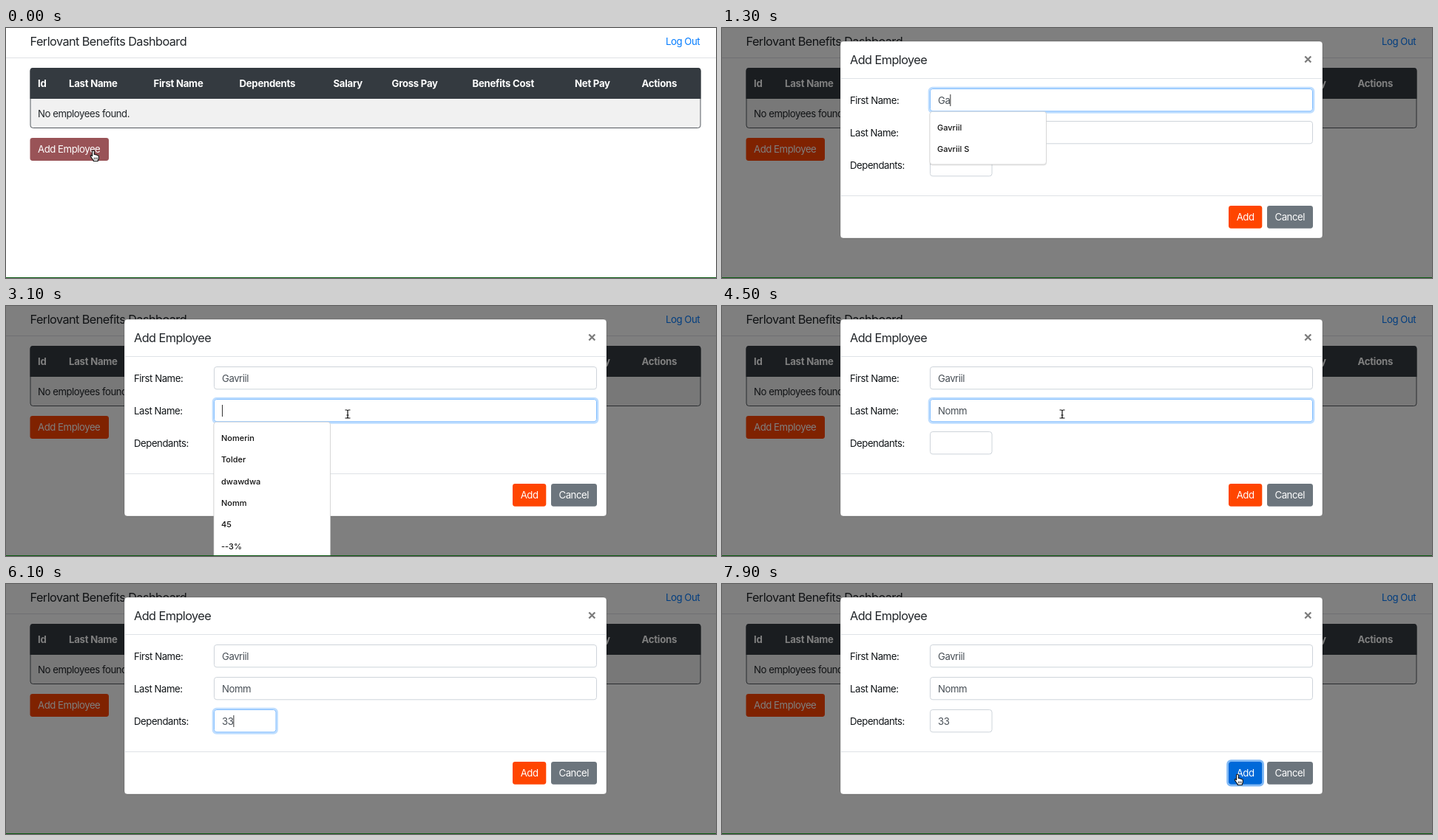
Recreate the animation shown at these times as an HTML page. Size 960 by 339 pixels, loop 8000 ms.

```html
<!DOCTYPE html>
<html lang="en">
<head>
<meta charset="utf-8">
<title>Benefits Dashboard</title>
<style>
html, body { margin: 0; width: 100%; height: 100%; overflow: hidden; background: #fff; }
svg { display: block; width: 960px; height: 339px; }
text { font: 400 13.2px Inter, "Liberation Sans", sans-serif; letter-spacing: -.035em; fill: #212529; white-space: pre; }
.title { font-size: 16.3px; }
.head { font-weight: 700; fill: #fff; letter-spacing: -.02em; }
.label { fill: #111518; }
.value { fill: #495057; }
.btn { fill: #fff; }
.item { font-size: 11px; font-weight: 500; fill: #111; letter-spacing: 0; }
</style>
</head>
<body>
<svg id="stage" viewBox="0 0 960 339" xmlns="http://www.w3.org/2000/svg"></svg>
<script>
const LOOP = 8000, STEP = 100;
const ORANGE = [255, 69, 0], BLUE = [0, 105, 217];
const stage = document.getElementById('stage');

const clamp = v => Math.max(0, Math.min(1, v));
const mix = k => `rgb(${ORANGE.map((c, i) => Math.round(c + (BLUE[i] - c) * k))})`;

function add(parent, tag, attrs = {}, content) {
  const el = document.createElementNS(stage.namespaceURI, tag);
  set(el, attrs);
  if (content !== undefined) el.textContent = content;
  parent.appendChild(el);
  return el;
}
function set(el, attrs) {
  for (const k in attrs) el.setAttribute(k, attrs[k]);
}
const group = (parent = stage) => add(parent, 'g');
const rect = (p, x, y, width, height, fill, more = {}) => add(p, 'rect', { x, y, width, height, fill, ...more });
const label = (p, x, y, str, cls = '', more = {}) => add(p, 'text', { x, y, class: cls, ...more }, str);
const show = (el, on) => el.setAttribute('visibility', on ? 'visible' : 'hidden');

// Page
rect(stage, 0, 0, 960, 339, '#fff');
label(stage, 32.5, 23.5, 'Ferlovant Benefits Dashboard', 'title', { fill: '#111' });
label(stage, 892, 22.5, 'Log Out', '', { style: 'fill:#007bff' });
rect(stage, 0, 40, 960, 1, '#dfe2e5');
rect(stage, 33, 54.5, 906, 81, '#f1f1f1', { rx: 3.5, stroke: '#555a60' });
add(stage, 'path', { d: 'M32.5 96V58q0-4 4-4H935.500q4 0 4 4V96z', fill: '#343a40' });
const columns = { 43: 'Id', 85: 'Last Name', 199.5: 'First Name', 315.5: 'Dependents', 442.5: 'Salary',
  521.5: 'Gross Pay', 630.5: 'Benefits Cost', 769: 'Net Pay', 859.5: 'Actions' };
for (const x in columns) label(stage, x, 80, columns[x], 'head');
label(stage, 43, 120.5, 'No employees found.');
const openBtn = rect(stage, 32.5, 149, 106.5, 31, mix(0), { rx: 3.4 });
label(stage, 43, 169.300, 'Add Employee', 'btn');
const shade = rect(stage, 0, 0, 960, 339, '#000');

// Dialog
const dialog = group();
rect(dialog, 160, 18, 652, 267, '#fff', { rx: 4, stroke: '#000', 'stroke-opacity': .22 });
label(dialog, 173, 49.3, 'Add Employee', 'title');
add(dialog, 'path', { d: 'M788.3 38.5l8 8m0-8l-8 8', stroke: '#7b7b7b', 'stroke-width': 2.3 });
rect(dialog, 160.5, 68, 651, 1, '#dee2e6');
rect(dialog, 160.5, 227, 651, 1, '#dee2e6');
const addRing = rect(dialog, 683.6, 239.600, 48, 33.5, 'none', { rx: 4.600, stroke: '#80b8f5', 'stroke-width': 2.7 });
const addBtn = rect(dialog, 685, 241, 45.3, 30.700, mix(0), { rx: 3.4 });
label(dialog, 695.7, 261.2, 'Add', 'btn');
rect(dialog, 737, 241, 62, 30.700, '#6c757d', { rx: 3.4 });
label(dialog, 747.5, 261.2, 'Cancel', 'btn');

const fields = [
  { name: 'First Name:', y: 82.5, w: 517, text: 'Gavriil', focus: 200, blur: 2800,
    keys: [1000, 1300, 1500, 1700, 1800, 1900, 2000],
    menus: [[1000, 1300, ['Gavriil', 'Gavriil S', 'Gleb', 'Gg']], [1300, 2800, ['Gavriil', 'Gavriil S']]] },
  { name: 'Last Name:', y: 126.5, w: 517, text: 'Nomm', focus: 2800, blur: 4900,
    keys: [3200, 3500, 3800, 4000],
    menus: [[3000, 3200, ['Nomerin', 'Tolder', 'dwawdwa', 'Nomm', '45', '--3%', '12']],
      [3200, 4000, ['Nomerin', 'Nomm', 'Nomerina']]] },
  { name: 'Dependants:', y: 170.5, w: 83.5, text: '33', focus: 5000, blur: 7400, lag: 100,
    keys: [5900, 6100],
    menus: [[5200, 5900, ['3', '33', '2', '34', '12']], [5900, 6100, ['3', '33', '34', '3000']]] }
];

for (const f of fields) {
  label(dialog, 173, f.y + 20.2, f.name, 'label');
  f.ring = rect(dialog, 280, f.y - 1.5, f.w + 3, 33.3, 'none', { rx: 4.6, stroke: '#bfdeff', 'stroke-width': 2.7 });
  f.box = rect(dialog, 281.5, f.y, f.w, 30.3, '#fff', { rx: 3.4 });
  f.value = label(dialog, 292, f.y + 20.2, '', 'value');
  f.caret = rect(dialog, 292, f.y + 7.5, 1, 16, '#333');
}
for (const f of fields) {
  f.lists = f.menus.map(([, , items]) => {
    const g = group(), top = f.y + 31.3, h = items.length * 29.3 + 13;
    rect(g, 280.500, top, 158.5, h + 1, '#000', { rx: 4, opacity: .1 });
    rect(g, 281, top - .5, 157.5, h, '#fff', { rx: 3.5, stroke: '#ccc', 'stroke-width': .7 });
    items.forEach((s, i) => label(g, 291, top + 25.3 + i * 29.3, s, 'item'));
    return g;
  });
}

// Pointer
const icons = { hand: group(), arrow: group(), beam: group() };
const outline = { fill: '#fff', stroke: '#111', 'stroke-width': 1.1, 'stroke-linejoin': 'round' };
add(icons.hand, 'path', { ...outline, d: 'M-1.4 1Q-1.4-.4 0-.4T1.3 1V5Q3.3 4.400 3.6 5.6Q5.2 5.1 5.5 6.3Q7.3 6 7.3 7.6V10Q7.3 11.500 6.3 12.800V14H.2V13Q-1.2 11.5-2.4 9.3-4.2 7-3.6 6.4-2.8 5.700-1.4 7.2Z' });
add(icons.hand, 'path', { d: 'M1.3 9v3M3.2 9v3M5.1 9v3', stroke: '#111', 'stroke-width': .8 });
add(icons.arrow, 'path', { d: 'M0 0V11.500L2.7 9 4.500 13.2 6.500 12.3 4.700 8.3H8.2Z', fill: '#111', stroke: '#fff', 'stroke-width': .9 });
const beam = 'M-3.5-5.5H-1.5Q0-5.5 0-4V4Q0 5.5-1.5 5.5H-3.5M3.5-5.5H1.5Q0-5.5 0-4M0 4Q0 5.5 1.5 5.5H3.5M-1.5 1.500H1.5';
add(icons.beam, 'path', { d: beam, fill: 'none', stroke: '#fff', 'stroke-width': 2.6 });
add(icons.beam, 'path', { d: beam, fill: 'none', stroke: '#111', 'stroke-width': 1.2 });

rect(stage, 0, 338, 960, 1, '#0c5a12');

// time, x, y, icon; no icon means hidden
const path = [
  [0, 118, 166.5, 'hand'], [200, 117, 166, 'arrow'], [500, 203, 164, 'arrow'], [1000, 203, 164],
  [2400, 203, 164, 'arrow'], [2500, 255, 160, 'arrow'], [2600, 365, 152, 'arrow'], [2700, 440, 147, 'beam'],
  [2800, 462, 146.500, 'beam'], [3200, 462, 146.5],
  [4500, 460, 146.5, 'beam'], [4700, 400, 166, 'arrow'], [4900, 336, 186, 'beam'], [5300, 336, 186],
  [6500, 380, 200, 'arrow'], [6700, 386, 203, 'arrow'], [7000, 560, 236, 'arrow'],
  [7200, 690, 254, 'hand'], [7400, 707, 252, 'hand'], [7600, 707, 252, 'hand'],
  [7900, 697, 258.5, 'hand'], [LOOP, 697, 258.5, 'hand']
];

function drawPointer(t) {
  const i = path.findIndex(p => p[0] > t) - 1;
  const [t0, x0, y0, icon] = path[i], [t1, x1, y1] = path[i + 1];
  const k = (t - t0) / (t1 - t0);
  const x = x0 + (x1 - x0) * k, y = y0 + (y1 - y0) * k;
  for (const n in icons) show(icons[n], n === icon);
  if (icon) set(icons[icon], { transform: `translate(${x} ${y})` });
}

function drawField(f, t) {
  const typed = f.keys.filter(k => k <= t);
  const glow = clamp((t - f.focus + 60) / 150) * (t < f.focus ? 0 : 1) * (1 - clamp((t - f.blur + 60) / 150) * (t >= f.blur));
  set(f.ring, { opacity: glow });
  set(f.box, { stroke: glow > .3 ? '#80bdff' : '#ced4da' });
  f.value.textContent = f.text.slice(0, typed.length);
  const last = typed.length ? typed[typed.length - 1] : f.focus;
  const lit = Math.floor((t - last + (f.lag || 0)) / 500) % 2 === 0;
  const end = typed.length ? f.value.getComputedTextLength() : 0;
  set(f.caret, { x: 292 + end, opacity: t >= f.focus && t < f.blur && lit ? 1 : 0 });
  f.menus.forEach(([from, to], i) => show(f.lists[i], t >= from && t < to));
}

function draw(t) {
  const open = clamp(t / 200);
  set(shade, { opacity: open / 2 });
  set(dialog, { opacity: open, transform: `translate(0 ${-40 * (1 - open) ** 2})` });
  set(openBtn, { fill: mix(.4 * clamp((350 - t) / 150)) });
  set(addBtn, { fill: mix(clamp((t - 7130) / 150)) });
  set(addRing, { opacity: clamp((t - 7340) / 150) });
  fields.forEach(f => drawField(f, t));
  drawPointer(t);
}

const start = performance.now();
function tick() {
  const t = (performance.now() - start) % LOOP;
  draw(Math.floor(t / STEP) * STEP);
  requestAnimationFrame(tick);
}
tick();
</script>
</body>
</html>
```
